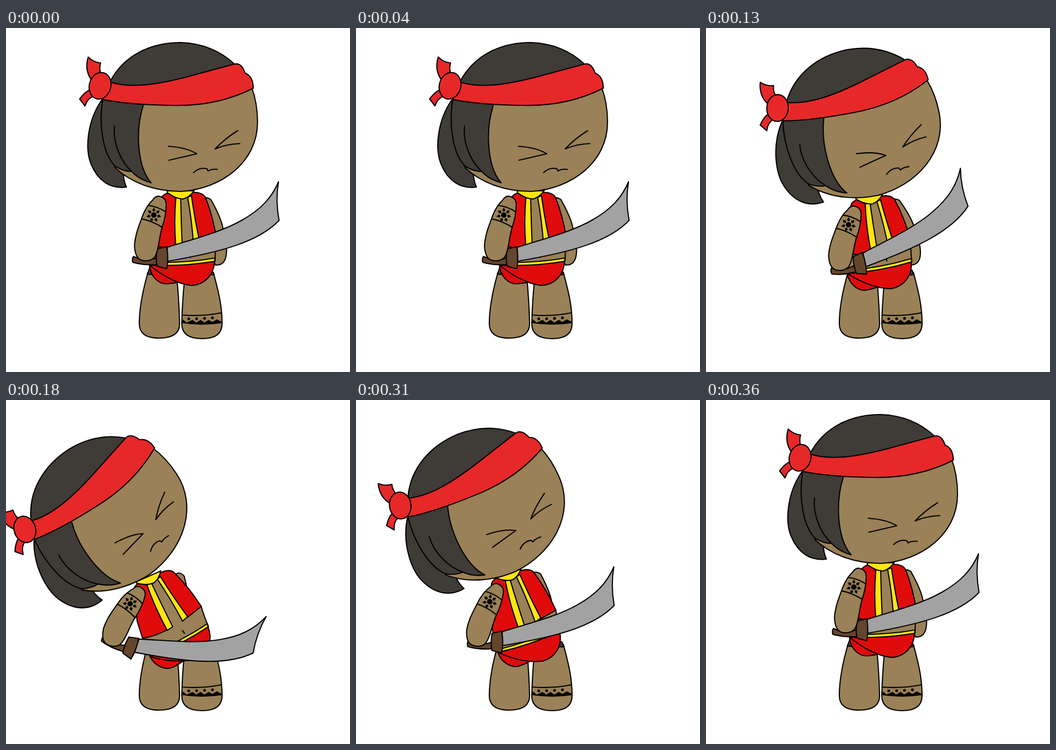
Recreate the animation shown at these times as an HTML page. Size 640 px wide and 640 px high, loop 420 ms.

```html
<!DOCTYPE html>
<html>
<head>
<meta charset="utf-8">
<style>
  html, body { margin: 0; height: 100%; overflow: hidden; background: #fff; }
  svg { display: block; width: 100vw; height: 100vh; }
  path, ellipse { stroke: #000; stroke-width: 2.1; stroke-linejoin: round; stroke-linecap: round; }
  .skin { fill: #9a8157; }
  .hair { fill: #3f3b36; }
  .band { fill: #e72829; }
  .vest { fill: #e00b0b; }
  .gold { fill: #ffe510; }
  .steel { fill: #a2a2a2; }
  .wood { fill: #65452b; }
  .line { fill: none; }
  .ink { fill: #000; stroke: none; }
</style>
</head>
<body>
<svg viewBox="0 0 640 640">
  <g id="backArm">
    <path class="skin" d="M366 318Q372 313 381 319C393 340 402 360 404 375Q412 405 410 420Q408 442 390 441L370 400Z"/>
  </g>

  <g id="legs">
    <path class="skin" d="M264 455C254 490 248 520 248 550Q248 577 285 577Q323 577 323 550Q322 510 318 465Z"/>
    <path class="skin" d="M332 470Q328 510 327 550Q327 578 365 578Q402 578 402 550C402 510 392 480 386 455Z"/>
    <path class="hair" d="M268 444L263 458L330 462L387 459L383 450Z"/>
    <path class="line" d="M328 534Q365 537 400 530"/>
    <path class="ink" d="M329 542l7 6l11 -5l7 5l8 -5l7 5l8 -5l7 4l8 -5l10 5V549Q365 555 328 549Z"/>
    <g id="dots"></g>
  </g>

  <g id="torso">
    <path class="skin" d="M301 308L268 404L267 441L389 434Q389 412 392 394L350 308Z"/>
    <path class="vest" d="M267 441C268 460 282 476 298 476Q314 475 324 472Z"/>
    <path class="vest" d="M267 441Q330 444 388 434C387 459 370 478 344 479C320 476 292 462 267 441Z"/>
    <path class="gold" d="M267 436Q330 438 389 428L388 434Q330 444 267 441Z"/>
    <path class="line" d="M342 421L343 427"/>
    <path class="vest" d="M301 307Q294 309 290 314L272 370L268 404Q292 410 316 408L317 317Z"/>
    <path class="vest" d="M342 306Q365 304 371 315Q385 350 392 394L361 402L343 314Z"/>
    <path class="gold" d="M316 316L325 317Q326 365 328 407L316 409Q312 360 316 316Z"/>
    <path class="gold" d="M338 315L345 312Q352 360 361 401L349 405Q346 360 338 315Z"/>
    <path class="gold" d="M300 303H350Q341 315 330 318Q318 319 300 306Z"/>
  </g>

  <g id="sword">
    <path class="wood" d="M237 425Q260 436 282 427V440Q255 442 236 436Q234 430 237 425Z"/>
    <path class="steel" d="M300 408C350 392 400 380 440 357C475 337 495 315 507 286Q501 320 508 358C470 398 400 417 300 434Z"/>
    <path class="wood" d="M281 411L299 407Q303 428 299 448L281 443Q278 427 281 411Z"/>
  </g>

  <g id="arm">
    <path class="skin" d="M273 320Q278 312 285 313Q298 316 298 328Q298 350 290 372C284 395 284 415 276 427Q266 436 252 432Q240 428 239 405C240 385 247 370 252 355Q260 332 273 320Z"/>
    <path class="line" d="M264 330Q282 332 297 342M252 355Q272 359 291 371"/>
    <g id="sun"></g>
  </g>

  <g id="head">
    <path class="hair" d="M178 134C150 175 148 225 157 250C170 285 195 300 224 296Q217 280 219 262Z"/>
    <path class="skin" d="M190 130L203 260C235 290 280 304 325 304C400 300 468 250 468 175Q468 140 457 110Z"/>
    <path class="hair" d="M194 99C220 50 270 27 325 27Q385 29 426 68L380 110L200 125Z"/>
    <path class="hair" d="M180 132C172 180 180 235 204 258Q220 267 234 267Q248 282 270 288C244 258 240 190 256 142Z"/>
    <path class="line" d="M202 182C198 215 215 250 234 267"/>
    <path class="band" d="M192 100C230 113 280 106 340 90L425 67Q438 64 445 84Q460 90 460 112C405 140 350 145 310 144Q230 143 180 133Z"/>
    <path class="band" d="M160 98C150 85 148 70 153 54Q163 64 176 65Q173 75 176 84Z"/>
    <path class="band" d="M156 115C148 118 140 128 137 132L147 145Q152 130 163 127Z"/>
    <ellipse class="band" cx="175" cy="107.500" rx="20" ry="25" transform="rotate(15 175 107.500)"/>
    <path class="line" d="M302 220Q335 222 355 234L303 246"/>
    <path class="line" d="M431 191Q407 206 389 225Q410 216 435 215"/>
    <path class="line" d="M349 269Q361 258 374 262L376 266Q382 262 393 263"/>
  </g>
</svg>
<script>
  const $ = id => document.getElementById(id);
  const repeat = (n, make) => Array.from({ length: n }, (_, i) => make(i)).join('');

  $('dots').innerHTML = repeat(4, i =>
    `<circle class="ink" cx="${340 + 14.7 * i}" cy="${541 - i * i / 5}" r="2.600"/>`);

  $('sun').innerHTML = '<circle class="ink" cx="275" cy="348" r="5"/>' + repeat(7, i =>
    `<path class="ink" d="M275 342l3 -3l-3 -5l-3 5z" transform="rotate(${i * 360 / 7} 275 348)"/>`);

  // pivot: joint at rest; swing: x, y and angle at full lean; drag: extra offset on the way.
  const joints = {
    head:    { pivot: [320, 165], swing: [-132, 45, -33], drag: [52, -18, -3] },
    torso:   { pivot: [327, 318], swing: [-54, 23, -24],  drag: [-9, 9, 5] },
    arm:     { pivot: [275, 348], swing: [-44, 31, 15],   drag: [24, 40, -20] },
    backArm: { pivot: [374, 318], swing: [-49, 7, 15],    drag: [-26, 0, -55] },
    sword:   { pivot: [290, 428], swing: [-59, 32, 20.5], drag: [78, 8, -88] }
  };

  // The lean is held in steps: upright, leaning, full, returning, upright.
  function leanAt(ms) {
    if (ms < 60 || ms >= 360) return 0;
    return ms < 180 ? 0.33 : ms < 240 ? 1 : 0.68;
  }

  function draw() {
    const lean = leanAt(performance.now() % 420);
    const lag = lean * (1 - lean) ** 1.3;
    for (const [id, { pivot: [px, py], swing, drag }] of Object.entries(joints)) {
      const [dx, dy, angle] = swing.map((s, i) => s * lean + drag[i] * lag);
      $(id).setAttribute('transform', `translate(${dx} ${dy}) rotate(${angle} ${px} ${py})`);
    }
    requestAnimationFrame(draw);
  }
  draw();
</script>
</body>
</html>
```
